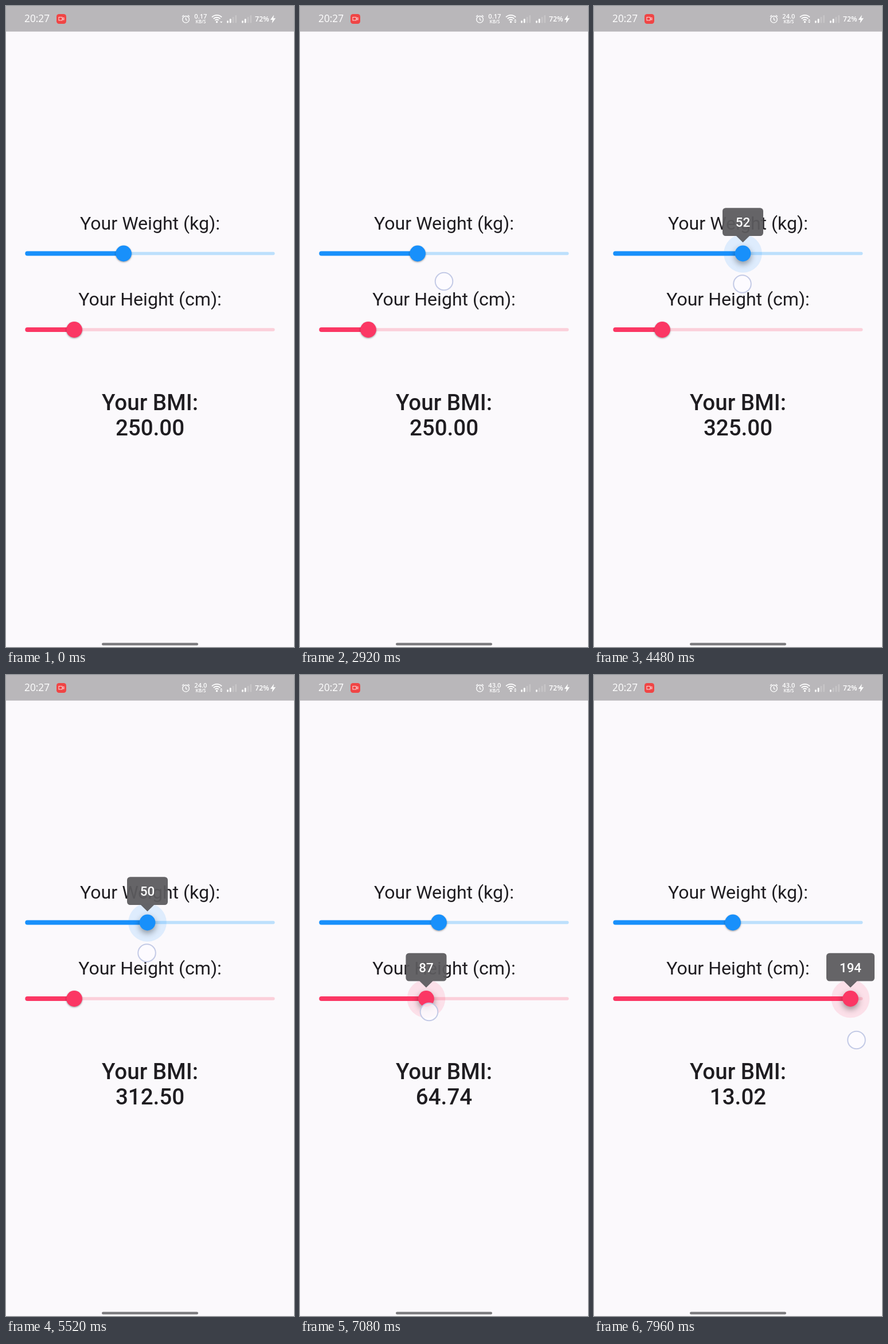
Animation of 502 by 1115 pixels, one loop 8 s. Source, as an HTML page with a canvas:

```html
<!DOCTYPE html>
<html lang="en">
<head>
<meta charset="utf-8">
<title>BMI sliders</title>
<style>
  html, body { margin: 0; width: 502px; height: 1115px; overflow: hidden; background: #fbf9fc; }
  canvas { display: block; }
</style>
</head>
<body>
<canvas id="stage" width="502" height="1115"></canvas>
<script>
const c = document.getElementById('stage').getContext('2d');
const LOOP = 8000;
const INK = '#1f1d21';
const ROBOTO = 'Roboto, sans-serif';
const STATUS = '"Open Sans", sans-serif';

const ramp = (t, from, to) => Math.min(1, Math.max(0, (t - from) / (to - from)));
const smooth = (t, from, to) => {
  const p = ramp(t, from, to);
  return p * p * (3 - 2 * p);
};

// The finger's drag along the lower slider; value and thumb trail behind it.
const drag = t => 119 + 98 * smooth(t, 6216, 6816) + 8 * ramp(t, 6860, 7080)
  + 232.5 * smooth(t, 7080, 7930);

const weight = {
  y: 430.5, rgb: '24,144,251', track: '#bde0fc',
  thumb: t => 205 + 47 * ramp(t, 2960, 3080) - 3 * ramp(t, 3080, 3720) + 10.5 * ramp(t, 3720, 4440)
    - 4.1 * ramp(t, 4600, 4880) - 8.9 * ramp(t, 5200, 5520) - 4.5 * ramp(t, 5920, 6080),
  value: t => Math.round(40.1 + (weight.thumb(t) - 205) / 4.4),
  press: t => ramp(t, 2960, 3080) - ramp(t, 5940, 6080)
};
const height = {
  y: 563, rgb: '251,55,100', track: '#fbd0da',
  thumb: t => drag(t - 140),
  value: t => Math.round((drag(t - 60) - 32.5) / 2.187),
  press: t => ramp(t, 6320, 6420)
};
const sliders = [weight, height];

function text(s, x, y, font, color, align = 'center') {
  c.font = font;
  c.fillStyle = color;
  c.textAlign = align;
  c.fillText(s, x, y);
}

function box(x, y, w, h, r, color) {
  c.fillStyle = color;
  c.beginPath();
  c.roundRect(x, y, w, h, r);
  c.fill();
}

function disc(x, y, r, color) {
  c.fillStyle = color;
  c.beginPath();
  c.arc(x, y, r, 0, 7);
  c.fill();
}

function signal(x, full) {
  for (let i = 0; i < 4; i++) {
    const h = 4 + i * 3.2;
    box(x + i * 4.8, 29.5 - h, 2.7, h, 1, i < full ? '#fff' : 'rgba(255,255,255,.2)');
  }
}

function statusBar(t) {
  box(0, 0, 502, 44.5, 0, '#b9b7ba');
  text('20:27', 32, 28.3, '17.3px ' + STATUS, '#fff', 'left');

  box(88, 14, 17, 17, 4.5, '#f04545');
  c.strokeStyle = 'rgba(255,255,255,.8)';
  c.lineWidth = 1;
  c.strokeRect(92, 19.5, 6, 5.5);
  c.stroke(new Path2D('M98 22l3-1.8v4.2l-3-1.8'));

  c.strokeStyle = '#fff';
  c.lineWidth = 1.3;
  disc(313.5, 23.3, 5.8, 'transparent');
  c.stroke();
  c.stroke(new Path2D('M313.5 20v3.8l2.5 1M307 18.5l3-2.5M317 16l3 2.5'));

  const speed = t < 3400 ? '0.17' : t < 6880 ? '24.0' : '43.0';
  text(speed, 339.3, 22, '600 11px ' + STATUS, '#fff');
  text('KB/S', 339.5, 30.3, '600 8px ' + STATUS, '#fff');

  c.lineWidth = 1.9;
  for (let r = 4.5; r < 13; r += 3.8) {
    c.beginPath();
    c.arc(367.5, 28, r, -Math.PI * .75, -Math.PI * .25);
    c.stroke();
  }
  disc(367.5, 27.7, 1.7, '#fff');
  if (t >= 960) c.fill(new Path2D('M373 25.5l2.2-2.5 2.2 2.5z'));
  c.fill(new Path2D('M373 27h4.4l-2.2 2.5z'));

  signal(385, 2);
  signal(411, t < 6480 ? 2 : 1);
  text('72%', 434, 27, '600 12.3px ' + STATUS, '#fff', 'left');
  c.fill(new Path2D('M467 15.5L460.8 24h3.8l-1 6 6.4-8.7h-4z'));
}

function slider(s, t) {
  const x = s.thumb(t), press = s.press(t), color = `rgb(${s.rgb})`;
  box(x, s.y - 2.7, 468.5 - x, 5.4, 2.7, s.track);
  box(33.3, s.y - 4, x - 33.3, 8, 4, color);
  disc(x, s.y, 33.3 * press, `rgba(${s.rgb},.13)`);
  c.save();
  c.shadowColor = 'rgba(0,0,0,.38)';
  c.shadowBlur = 3 + 8 * press;
  c.shadowOffsetY = 1.2 + 3.5 * press;
  disc(x, s.y, 13.9, color);
  c.restore();
}

function bubble(s, t) {
  const press = s.press(t);
  if (!press) return;
  const label = String(s.value(t));
  const w = 45 + 13 * label.length;
  c.save();
  c.translate(s.thumb(t), s.y);
  c.scale(press, press);
  c.fillStyle = 'rgba(92,91,94,.94)';
  c.beginPath();
  c.roundRect(-w / 2, -79.3, w, 48.8, 5.5);
  c.moveTo(-11.5, -30.5);
  c.lineTo(11.5, -30.5);
  c.lineTo(0, -19.3);
  c.fill();
  text(label, 0, -46.5, '500 22.4px ' + ROBOTO, '#fff');
  c.restore();
}

function finger(x, y) {
  disc(x, y, 15.3, 'rgba(252,251,255,.82)');
  c.strokeStyle = '#c3cae6';
  c.lineWidth = 2;
  c.stroke();
}

function draw(t) {
  box(0, 0, 502, 1115, 0, '#fbf9fc');
  statusBar(t);

  const kg = weight.value(t), m = height.value(t) / 100;
  const title = '32.1px ' + ROBOTO, big = '500 38.5px ' + ROBOTO;
  text('Your Weight (kg):', 251, 388.7, title, INK);
  text('Your Height (cm):', 251, 521.2, title, INK);
  text('Your BMI:', 251, 702.5, big, INK);
  text((kg / (m * m)).toFixed(2), 251, 747.3, big, INK);

  for (const s of sliders) slider(s, t);
  for (const s of sliders) bubble(s, t);

  if (t >= 2920 && t < 6000)
    finger(weight.thumb(Math.max(t, 3080)) - 1, 479 + 4.5 * ramp(t, 2920, 3720));
  if (t >= 6280)
    finger(drag(t), 577 + 9 * ramp(t, 6280, 7080) + 49 * smooth(t, 7080, 7960));

  box(167, 1107.7, 168, 4.6, 2.3, '#7d7c7f');
}

const start = performance.now();
function tick() {
  draw((performance.now() - start) % LOOP);
  requestAnimationFrame(tick);
}
tick();
</script>
</body>
</html>
```
